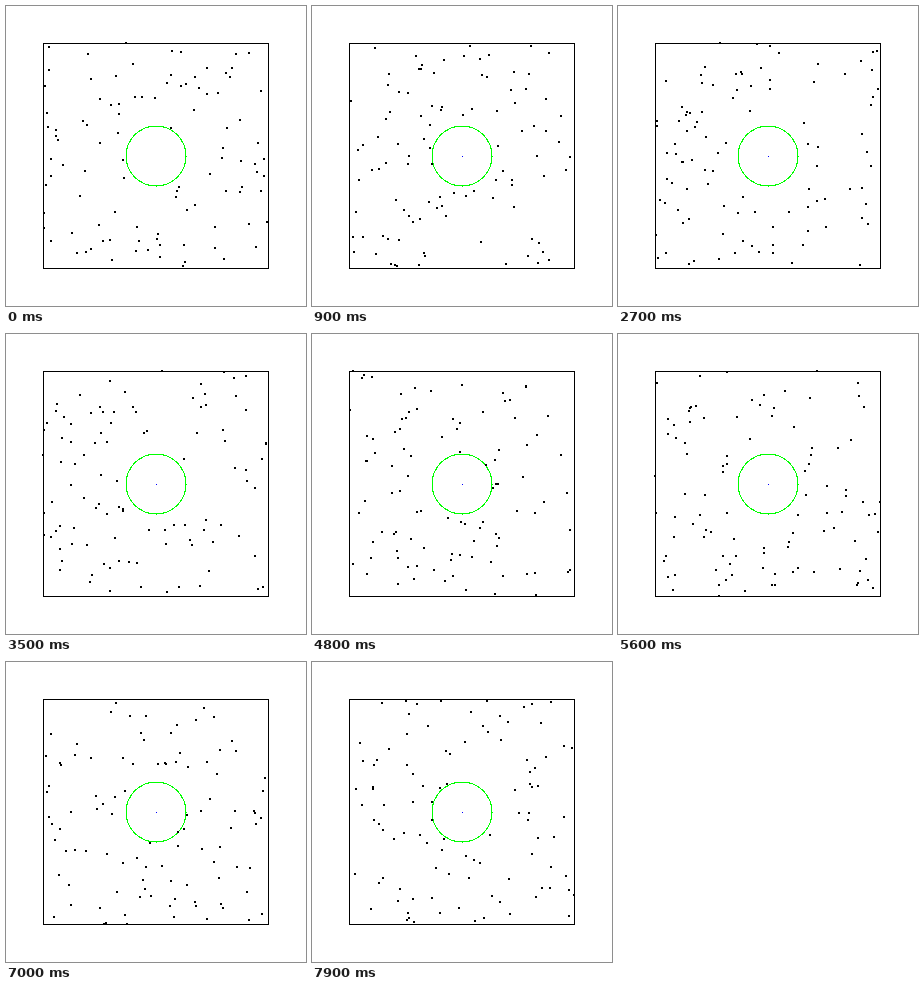
Write a matplotlib script that moves like this. It is 300 by 300 pixels and loops after 8 s.

```python
import numpy as np
import matplotlib.pyplot as plt
from matplotlib.animation import FuncAnimation
from matplotlib.collections import PolyCollection
from matplotlib.patches import Rectangle

SIZE, DPI = 300, 100
FRAMES, INTERVAL = 80, 100
LOW, HIGH = 37, 263
CENTER, RADIUS = 150, 30
COUNT, SPEED, SUBSTEPS = 100, 5.0, 10


def start_positions(rng):
    """Uniform points in the box, outside the disc."""
    pos = rng.uniform(LOW, HIGH, (COUNT * 2, 2))
    outside = np.hypot(*(pos - CENTER).T) > RADIUS + 1
    return pos[outside][:COUNT]


def step(pos, vel):
    """Advance freely, then bounce off the walls and the disc."""
    pos = pos + vel
    for wall, sign in ((LOW, 1), (HIGH, -1)):
        hit = (pos - wall) * sign < 0
        pos = np.where(hit, 2 * wall - pos, pos)
        vel = np.where(hit, sign * np.abs(vel), vel)

    offset = pos - CENTER
    dist = np.hypot(*offset.T)[:, None]
    normal = offset / dist
    inward = (vel * normal).sum(axis=1, keepdims=True)
    hit = (dist < RADIUS) & (inward < 0)
    vel = np.where(hit, vel - 2 * inward * normal, vel)
    pos = np.where(hit, pos + 2 * (RADIUS - dist) * normal, pos)
    return pos, vel


def simulate():
    rng = np.random.default_rng(7)
    pos = start_positions(rng)
    vel = rng.normal(0, SPEED / SUBSTEPS, (COUNT, 2))
    track = []
    for _ in range(FRAMES):
        track.append(pos)
        for _ in range(SUBSTEPS):
            pos, vel = step(pos, vel)
    return track


def squares(corners, side):
    """Pixel-aligned squares from their top-left corners."""
    unit = np.array([[0, 0], [1, 0], [1, 1], [0, 1]])
    return np.asarray(corners)[:, None, :] + side * unit


def circle_pixels():
    """Circle outline plotted degree by degree, truncated to whole pixels."""
    angle = np.radians(np.arange(360))
    points = CENTER + RADIUS * np.column_stack([np.cos(angle), np.sin(angle)])
    return np.unique(np.floor(points), axis=0)


def add_squares(corners, side, color):
    cells = PolyCollection(squares(corners, side), facecolors=color,
                           edgecolors="none", linewidths=0,
                           antialiaseds=False, snap=False)
    ax.add_collection(cells, autolim=False)
    return cells


fig = plt.figure(figsize=(SIZE / DPI, SIZE / DPI), dpi=DPI, facecolor="white")
ax = fig.add_axes([0, 0, 1, 1])
ax.set(xlim=(0, SIZE), ylim=(SIZE, 0))
ax.axis("off")

track = simulate()
ax.add_patch(Rectangle((LOW + 0.5, LOW + 0.5), HIGH - LOW - 1, HIGH - LOW - 1,
                       fill=False, edgecolor="black", linewidth=72 / DPI,
                       antialiased=False, snap=False))
add_squares(circle_pixels(), 1, "#00ff00")
core = add_squares([(CENTER, CENTER)], 1, "#0000ff")
dots = add_squares(np.floor(track[0]) - 1, 2, "black")


def update(i):
    dots.set_verts(squares(np.floor(track[i]) - 1, 2))
    core.set_visible(i > 0)
    return dots, core


anim = FuncAnimation(fig, update, frames=FRAMES, interval=INTERVAL,
                     repeat=True, repeat_delay=0, blit=False)
plt.show()
```
